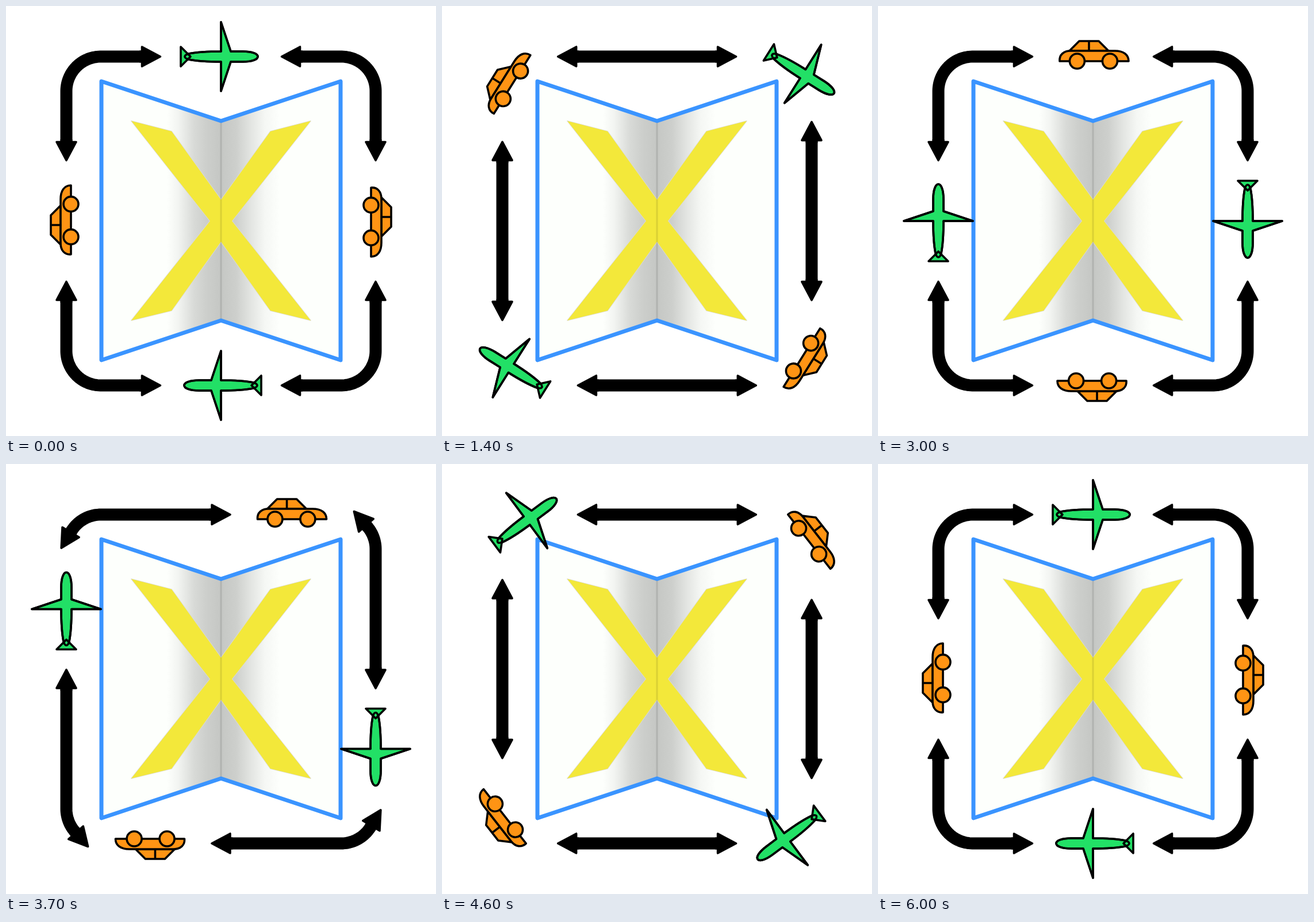
An HTML page with a canvas that plays this animation: 748x748 px, repeating every 6100 ms.

```html
<!DOCTYPE html>
<html lang="en">
<head>
<meta charset="utf-8">
<title>Loop around a folded page</title>
<style>
html, body { margin: 0; width: 100%; height: 100%; overflow: hidden; background: #fff; }
canvas { display: block; width: 748px; height: 748px; }
</style>
</head>
<body>
<canvas id="stage" width="748" height="748"></canvas>
<script>
const ctx = document.getElementById('stage').getContext('2d');
const MID = 374, RAD = Math.PI / 180;
const STEP = 100, FRAMES = 61;

// Rounded track around the page
const HALF_W = 269, HALF_H = 286, R = 60, BEND = 86;
const QUARTER = HALF_W + HALF_H - 2 * R + BEND;

// Poses as [step, x, y, degrees]; long spans are straight runs
const planeTrack = [
  [0, 374, 88, 0], [10.5, 556.3, 88, 0], [14, 627.7, 118, 32.2],
  [18.5, 654, 176, 78], [22, 643, 235.1, 90], [39.5, 643, 538.9, 90],
  [42, 634, 584, 101], [46, 600.5, 649.5, 143.4], [49, 556, 654.5, 170],
  [52, 512.9, 660, 180], [60, 374, 660, 180]
];
const carTrack = [
  [0, 105, 374, -90], [10.5, 105, 191.7, -90], [14, 114.2, 133.8, -58],
  [19, 188, 93, -8], [22, 235.1, 88, 0], [40.5, 556.3, 88, 0],
  [46, 643.8, 128.6, 52], [49, 653.5, 180, 82], [52, 643, 235.1, 90],
  [60, 643, 374, 90]
];

const planeBody = new Path2D(
  'M64 0C64-5 54-9 38-9L17-9L0-60L0-9C-24-9-46-7-56-5Q-63-3-63 0' +
  'Q-63 3-56 5C-46 7-24 9 0 9L0 60L17 9L38 9C54 9 64 5 64 0Z');
const planeTail = new Path2D('M-70-17L-53 0L-70 17Z');
const carBody = new Path2D(
  'M-58 8C-59-3-51-10-39-10L38-10C52-10 62-4 62 8Z');
const carCabin = new Path2D('M-41-10L-24-27L10-27L27-10ZM-7-27L-7-10');
const wheels = new Path2D();
for (const x of [-27.6, 29.4]) {
  wheels.moveTo(x + 13, 8);
  wheels.arc(x, 8, 13, 0, 2 * Math.PI);
}

const pageShape = new Path2D('M166 131L374 200L582 131V616L374 547L166 616Z');
const cross = new Path2D(
  'M218 200L288 218L374 337L460 218L530 200L393 374' +
  'L530 547L460 530L374 410L288 530L218 547L355 374Z');
const shade = ctx.createLinearGradient(166, 0, 582, 0);
for (const [x, color] of [
  [280, '#fdfffc'], [300, '#f2f4f1'], [327, '#d8dad7'], [350, '#cccecb'],
  [374, '#c5c7c4'], [400, '#cdcfcc'], [425, '#e2e4e1'], [450, '#f5f7f4'],
  [476, '#fdfffc']
]) shade.addColorStop((x - 166) / 416, color);

function paint(shape, fill, stroke = '#000', width = 3.6) {
  ctx.fillStyle = fill;
  ctx.strokeStyle = stroke;
  ctx.lineWidth = width;
  ctx.fill(shape);
  ctx.stroke(shape);
}

function drawPage() {
  ctx.fillStyle = shade;
  ctx.fill(pageShape);
  paint(cross, '#f3e83a', '#dcdcd8', 1.6);
  ctx.fillStyle = '#f3e83a';
  ctx.fill(cross);
  ctx.fillStyle = 'rgba(0,0,0,.1)';
  ctx.fillRect(372.5, 200, 3, 347);
  ctx.strokeStyle = '#3a94ff';
  ctx.lineWidth = 7;
  ctx.stroke(pageShape);
}

function drawPlane() {
  paint(planeBody, '#22e066');
  paint(planeTail, '#22e066');
  ctx.stroke(planeBody);
}

function drawCar() {
  paint(carCabin, '#ff9414');
  paint(carBody, '#ff9414');
  paint(wheels, '#ff9414');
}

// Smooth interpolation that keeps straight runs at constant speed
function poseAt(track, k) {
  let i = 0;
  while (i < track.length - 2 && k >= track[i + 1][0]) i++;
  const span = j => track[j + 1][0] - track[j][0];
  const rate = (a, b, c) => (track[b][c] - track[a][c]) / (track[b][0] - track[a][0]);
  const last = track.length - 1;
  const slope = (j, c) => {
    if (j === 0 || (j < last && span(j) > 7)) return rate(j, j + 1, c);
    if (j === last || span(j - 1) > 7) return rate(j - 1, j, c);
    return rate(j - 1, j + 1, c);
  };
  const d = span(i), u = (k - track[i][0]) / d, v = 1 - u;
  return [1, 2, 3].map(c =>
    v * v * (1 + 2 * u) * track[i][c] + u * u * (1 + 2 * v) * track[i + 1][c] +
    d * u * v * (v * slope(i, c) - u * slope(i + 1, c)));
}

function drawPair(track, k, draw) {
  const [x, y, deg] = poseAt(track, k);
  for (const turn of [0, Math.PI]) {
    ctx.save();
    ctx.translate(MID, MID);
    ctx.rotate(turn);
    ctx.translate(x - MID, y - MID);
    ctx.rotate(deg * RAD);
    draw();
    ctx.restore();
  }
}

// Point and heading at distance s, clockwise from the top centre
function trackPoint(s) {
  const q = Math.floor(s / QUARTER);
  const [w, h] = q % 2 ? [HALF_H, HALF_W] : [HALF_W, HALF_H];
  const d = s - q * QUARTER, into = d - (w - R);
  const bend = Math.min(1, Math.max(0, into / BEND)) * Math.PI / 2;
  let x = d, y = -h;
  if (into > BEND) {
    x = w;
    y = R - h + into - BEND;
  } else if (into > 0) {
    x = w - R + R * Math.sin(bend);
    y = R - h - R * Math.cos(bend);
  }
  const turn = q * Math.PI / 2, c = Math.cos(turn), n = Math.sin(turn);
  return { x: MID + x * c - y * n, y: MID + x * n + y * c, angle: turn + bend, bend };
}

function drawHead(p, flip) {
  ctx.save();
  ctx.translate(p.x, p.y);
  ctx.rotate(p.angle + (flip ? Math.PI : 0));
  ctx.translate(6 * Math.sin(2 * p.bend), 0);
  ctx.fillRect(-8, -10.5, 10, 21);
  ctx.beginPath();
  ctx.moveTo(-3.5, -17);
  ctx.lineTo(28.5, 0);
  ctx.lineTo(-3.5, 17);
  ctx.closePath();
  ctx.lineWidth = 3.6;
  ctx.fill();
  ctx.stroke();
  ctx.restore();
}

function drawArrow(s) {
  const reach = 126.5, parts = 100;
  ctx.fillStyle = ctx.strokeStyle = '#000';
  ctx.beginPath();
  for (let i = 0; i <= parts; i++) {
    const p = trackPoint(s + reach * (2 * i / parts - 1));
    ctx.lineTo(p.x, p.y);
  }
  ctx.lineWidth = 21;
  ctx.stroke();
  drawHead(trackPoint(s - reach), true);
  drawHead(trackPoint(s + reach), false);
}

function render(k) {
  ctx.fillStyle = '#fff';
  ctx.fillRect(0, 0, 748, 748);
  ctx.lineJoin = 'round';
  drawPage();
  for (let n = 0; n < 4; n++) drawArrow(((k - 15) / 30 + n) * QUARTER);
  drawPair(planeTrack, k, drawPlane);
  drawPair(carTrack, k, drawCar);
}

const start = performance.now();
function tick() {
  const t = Math.max(0, performance.now() - start);
  render(Math.floor(t / STEP) % FRAMES);
  requestAnimationFrame(tick);
}
tick();
</script>
</body>
</html>
```
